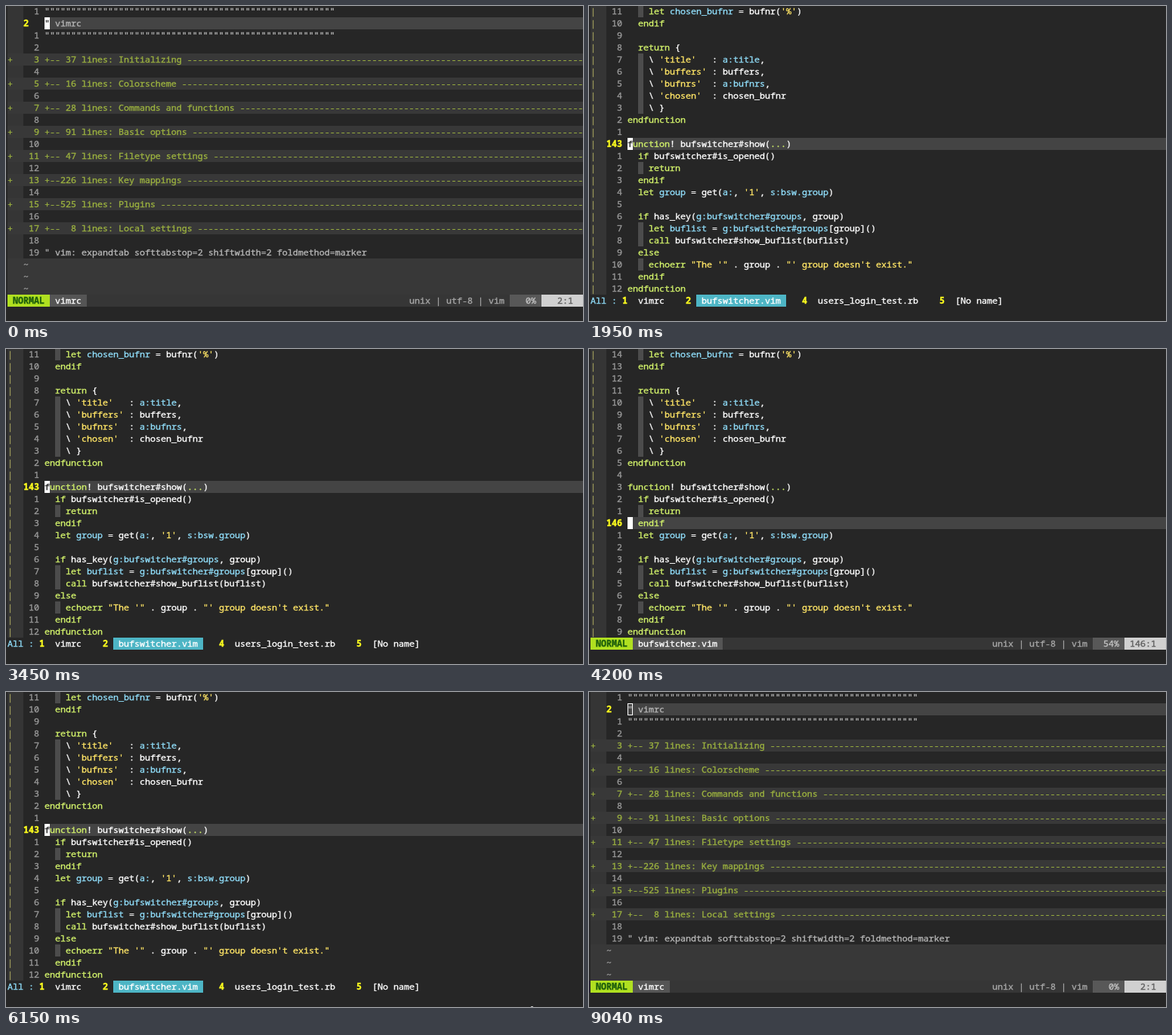
Animation of 764x418 px, one loop 9140 ms. Source, as an HTML page:

```html
<!DOCTYPE html>
<html lang="en">
<head>
<meta charset="utf-8">
<title>Buffer switching in Vim</title>
<style>
html, body { margin: 0; width: 100%; height: 100%; overflow: hidden; background: #262626; }
#screen {
  position: relative; width: 764px; height: 418px; overflow: hidden;
  background: #262626; color: #fff;
  font: 500 11.667px/15px "Noto Sans Mono", "DejaVu Sans Mono", monospace;
  font-variant-ligatures: none; font-kerning: none;
  -webkit-text-stroke: .35px currentColor;
}
#screen i, #screen b { position: absolute; display: block; height: 16px; }
#screen b { font-weight: inherit; white-space: pre; }
#screen .bold { font-weight: 700; }
#screen .mark { left: 695px; top: 417px; width: 3px; height: 1px; background: #c4c4c4; }
#screen .hollow { box-sizing: border-box; border: 1px solid #fff; }
.com { color: #b6b6b6; }
.num { color: #9a9a9a; }
.fold { color: #9bb13f; }
.bar { color: #a19f5c; }
.str { color: #ffe566; }
.key { color: #d3f36b; }
.sym { color: #f9b9a6; }
.id { color: #8fdcf8; }
.cur { color: #ffff1e; font-weight: 700 !important; }
.dark { color: #222; }
</style>
</head>
<body>
<div id="screen"></div>
<script>
const LOOP = 9140, CW = 7, RH = 16, TEXT = 7;
const screen = document.getElementById('screen');

const folds = [
  [37, 'Initializing'], [16, 'Colorscheme'], [28, 'Commands and functions'],
  [91, 'Basic options'], [47, 'Filetype settings'], [226, 'Key mappings'],
  [525, 'Plugins'], [8, 'Local settings']
];
const rule = '"'.repeat(55);
const buffers = {
  vimrc: {
    id: 1, col: 8, first: 1,
    syntax: /(?<com>.+)/g,
    lines: [
      rule, '" vimrc', rule, '',
      ...folds.flatMap(([n, name]) =>
        [`+--${String(n).padStart(3)} lines: ${name} `.padEnd(102, '-'), '']),
      '" vim: expandtab softtabstop=2 shiftwidth=2 foldmethod=marker'
    ]
  },
  'bufswitcher.vim': {
    id: 2, col: 20, first: 132, bar: true,
    syntax: /(?<str>"[^"]*"|'[^']*')|(?<key>\b(?:let|if|else|endif|return|function|endfunction|call|echoerr)\b|\.{3})|(?<id>\b[asg]:[\w#.]*|(?<=let )\w+)/g,
    lines: String.raw`    let chosen_bufnr = bufnr('%')
  endif

  return {
    \ 'title'   : a:title,
    \ 'buffers' : buffers,
    \ 'bufnrs'  : a:bufnrs,
    \ 'chosen'  : chosen_bufnr
    \ }
endfunction

function! bufswitcher#show(...)
  if bufswitcher#is_opened()
    return
  endif
  let group = get(a:, '1', s:bsw.group)

  if has_key(g:bufswitcher#groups, group)
    let buflist = g:bufswitcher#groups[group]()
    call bufswitcher#show_buflist(buflist)
  else
    echoerr "The '" . group . "' group doesn't exist."
  endif
endfunction`.split('\n')
  },
  'users_login_test.rb': {
    id: 4, col: 42, first: 1,
    syntax: /(?<com>#.*)|(?<str>'[^']*'|\b0\b)|(?<key>\b(?:require|class|def|end|do)\b)|(?<sym>:\w+|\b\w+:(?!:))|(?<id>@\w+|\b[A-Z]\w*(?:::\w+)*|\bsetup\b)/g,
    lines: `require 'test_helper'

class UsersLoginTest < ActionDispatch::IntegrationTest
  PASSWORD = 'password' # Default password of test user.

  def setup
    @user = users(:dorvian)
  end

  test 'login with valid information' do
    get login_path
    post login_path, session: { email: @user.email, password: PASSWORD }
    assert is_logged_in?
    assert_redirected_to @user
    follow_redirect!
    assert_template 'users/show'
    assert_select 'a[href=?]', login_path, count: 0
    assert_select 'a[href=?]', logout_path
    assert_select 'a[href=?]', user_path(@user)
  end

  test 'login with valid information followed by logout' do
    get login_path
    post login_path, session: { email: @user.email, password: PASSWORD }`.split('\n')
  },
  '[No name]': { id: 5, col: 68 }
};

// Each step lists only what changes from the one before.
const steps = [
  [0, { buf: 'vimrc', line: 2, list: false, cursor: 'block', mark: false }],
  [300, { cursor: 'off' }],
  [600, { cursor: 'block' }],
  [1050, { mark: true }],
  [1200, { list: true, mark: false }],
  [1800, { mark: true }],
  [1950, { buf: 'bufswitcher.vim', line: 143, mark: false }],
  [2550, { mark: true }],
  [2700, { buf: 'users_login_test.rb', line: 1, mark: false }],
  [3300, { mark: true }],
  [3450, { buf: 'bufswitcher.vim', line: 143, mark: false }],
  [3900, { list: false, line: 144 }],
  [4050, { line: 145 }],
  [4200, { line: 146 }],
  [4500, { line: 144 }],
  [4950, { line: 143 }],
  [5550, { mark: true }],
  [5700, { list: true, mark: false }],
  [6150, { mark: true }],
  [6450, { buf: 'vimrc', line: 2, mark: false }],
  [7050, { mark: true }],
  [7650, { cursor: 'off' }],
  [7950, { list: false, cursor: 'block', mark: false }],
  [9040, { cursor: 'hollow' }]
];
let last = {};
const states = steps.map(([at, change]) => (last = { ...last, ...change, at }));

function add(tag, cls, row, col) {
  const el = document.createElement(tag);
  if (cls) el.className = cls;
  el.style.left = 2 + col * CW + 'px';
  el.style.top = row * RH - 1 + 'px';
  return screen.appendChild(el);
}

function fill(row, col, cols, color, rows = 1) {
  const el = add('i', '', row, col);
  el.style.width = cols * CW + 'px';
  el.style.height = rows * RH + 'px';
  el.style.background = color;
}

function put(row, col, text, cls) {
  if (text.trim()) add('b', cls, row, col).textContent = text;
}

function putCode(row, text, syntax) {
  let at = 0;
  const plain = end => {
    const part = text.slice(at, end), lead = part.length - part.trimStart().length;
    put(row, TEXT + at + lead, part.trim());
  };
  for (const m of text.matchAll(syntax)) {
    plain(m.index);
    put(row, TEXT + m.index, m[0], Object.keys(m.groups).find(k => m.groups[k]));
    at = m.index + m[0].length;
  }
  plain(text.length);
}

function drawCursor(row, text, style) {
  if (style === 'off') return;
  const el = add('i', style === 'hollow' ? 'hollow' : '', row, TEXT);
  el.style.width = CW + 'px';
  if (style === 'hollow') return;
  el.style.background = '#fff';
  put(row, TEXT, text.charAt(0), 'dark');
}

function drawBuffer({ buf, line, cursor }) {
  const { first, lines, syntax, bar } = buffers[buf], active = line - first;
  fill(0, 0, 3, '#353535', 24);
  lines.forEach((text, row) => {
    const folded = text.startsWith('+--');
    const n = String(Math.abs(row - active)).padStart(3);
    if (bar) put(row, 0, '|', 'bar');
    if (folded) {
      fill(row, 0, 110, '#383838');
      put(row, 0, '+', 'fold');
      put(row, 3, n, 'fold');
      put(row, TEXT, text, 'fold');
      return;
    }
    if (row === active) fill(row, TEXT, 103, '#444');
    if (text.startsWith('    ')) fill(row, TEXT + 2, 1, '#4c4c4c');
    if (row === active) put(row, 3, String(line), 'cur');
    else put(row, 3, n, 'num');
    putCode(row, text, syntax);
    if (row === active) drawCursor(row, text, cursor);
  });
  for (let row = lines.length; row < 24; row++) {
    fill(row, 0, 110, '#383838');
    put(row, 3, '~', 'num');
  }
}

function drawList(current) {
  put(24, 0, 'All :', 'id');
  for (const [name, { id, col }] of Object.entries(buffers)) {
    put(24, col - 2, String(id), 'cur');
    if (name === current) fill(24, col, name.length + 2, '#4db5c5');
    put(24, col + 1, name);
  }
}

function drawStatus({ buf, line }) {
  const segment = (col, cols, bg, text, color, cls) => {
    fill(24, col, cols, bg);
    const lead = text.length - text.trimStart().length;
    const el = add('b', cls, 24, col + lead);
    el.textContent = text.trim();
    el.style.color = color;
  };
  const percent = buf === 'vimrc' ? 0 : Math.floor(line * 100 / 268);
  fill(24, 0, 110, '#363636');
  segment(0, 8, '#b0e020', ' NORMAL', '#1f5f0c', 'bold');
  segment(8, buf.length + 2, '#555', ' ' + buf, '#fff');
  segment(75, 20, '#363636', ' unix | utf-8 | vim', '#a8a8a8');
  segment(95, 6, '#585858', ' ' + String(percent).padStart(3) + '%', '#c4c4c4');
  segment(101, 9, '#d0d0d0', ' ' + String(line).padStart(3) + ':1', '#5c5c5c');
}

function draw(state) {
  screen.textContent = '';
  drawBuffer(state);
  if (state.list) drawList(state.buf);
  else drawStatus(state);
  if (state.mark) screen.appendChild(document.createElement('i')).className = 'mark';
}

let shown;
const start = performance.now();
function tick() {
  const t = (performance.now() - start) % LOOP;
  const state = states.findLast(s => s.at <= t);
  if (state !== shown) draw(shown = state);
  requestAnimationFrame(tick);
}
tick();
</script>
</body>
</html>
```
